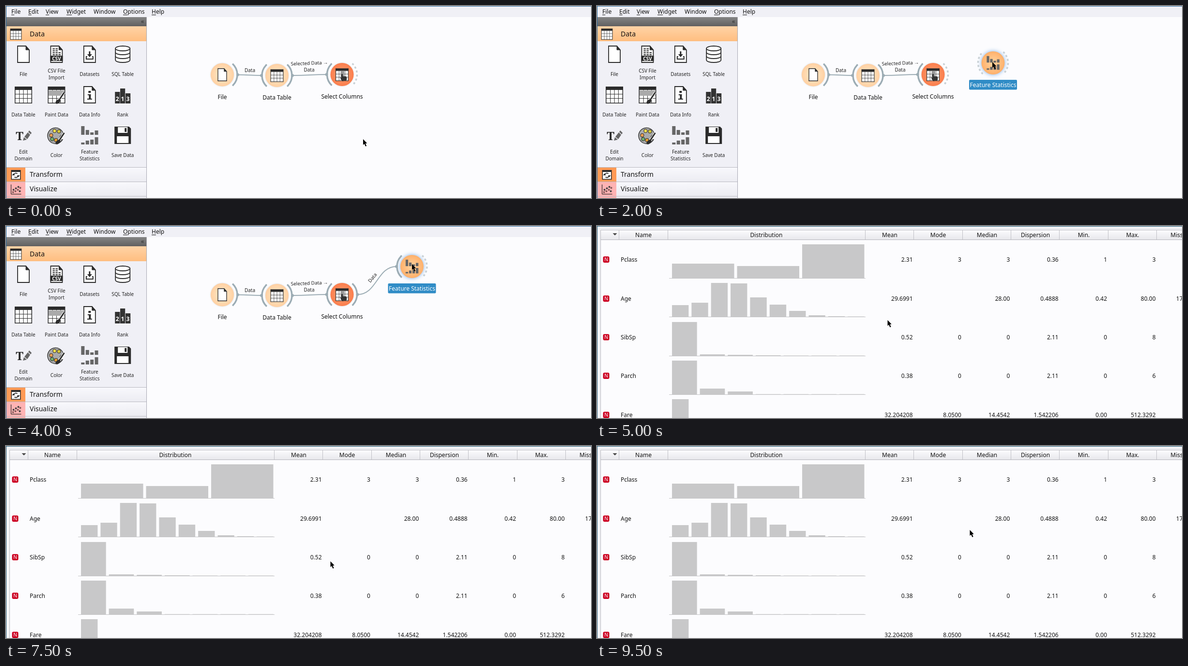
An HTML page with a canvas for the animation above (10 s loop, 1209x398 px).

```html
<!DOCTYPE html>
<html lang="en">
<head>
<meta charset="utf-8">
<title>Feature Statistics</title>
<style>
html, body { margin: 0; width: 100%; height: 100%; overflow: hidden; background: #fcfcfe; }
canvas { display: block; }
</style>
</head>
<body>
<canvas id="stage" width="1209" height="398"></canvas>
<script>
const W = 1209, H = 398, STEP = 500, LOOP = 10000;
const ctx = document.getElementById('stage').getContext('2d');
const INK = '#2b2b2b', GREY = '#666', LINK = '#9cacb4', PAPER = '#fcfcfe';
const FONT = '"Noto Sans", "Open Sans", sans-serif';

function rect(x, y, w, h, fill) {
  ctx.fillStyle = fill;
  ctx.fillRect(x, y, w, h);
}

function box(x, y, w, h, r, fill) {
  ctx.fillStyle = fill;
  ctx.beginPath();
  ctx.roundRect(x, y, w, h, r);
  ctx.fill();
}

function disc(x, y, r, fill) {
  ctx.fillStyle = fill;
  ctx.beginPath();
  ctx.arc(x, y, r, 0, Math.PI * 2);
  ctx.fill();
}

function poly(points, fill, stroke, width = 1) {
  ctx.beginPath();
  points.forEach(([x, y]) => ctx.lineTo(x, y));
  ctx.closePath();
  if (fill) { ctx.fillStyle = fill; ctx.fill(); }
  if (stroke) { ctx.strokeStyle = stroke; ctx.lineWidth = width; ctx.stroke(); }
}

function line(x1, y1, x2, y2, color, width = 1) {
  ctx.strokeStyle = color;
  ctx.lineWidth = width;
  ctx.beginPath();
  ctx.moveTo(x1, y1);
  ctx.lineTo(x2, y2);
  ctx.stroke();
}

function text(s, x, y, size = 12, align = 'left', color = '#111', style = '') {
  ctx.font = `${style} ${size}px ${FONT}`;
  ctx.textAlign = align;
  ctx.fillStyle = color;
  ctx.fillText(s, x, y);
}

function shade(y1, y2, ...colors) {
  const g = ctx.createLinearGradient(0, y1, 0, y2);
  colors.forEach((c, i) => g.addColorStop(i / (colors.length - 1), c));
  return g;
}

function at(x, y, scale, draw, angle = 0) {
  ctx.save();
  ctx.translate(x, y);
  ctx.rotate(angle);
  ctx.scale(scale, scale);
  draw();
  ctx.restore();
}

// Icons, each centred on the origin
function page() {
  poly([[-12, -17], [5, -17], [12, -9], [12, 17], [-12, 17]], '#fff', INK, 1.8);
  poly([[5, -17], [5, -9], [12, -9]], INK, INK, 1);
}

function csv() {
  page();
  for (let y = -12; y < 3; y += 4) {
    for (let x = -8; x < 8; x += 6) if (y > -8 || x < 3) rect(x, y, 4.5, 2, INK);
  }
  rect(-13, 3, 26, 11, INK);
  text('CSV', 0, 12.5, 10, 'center', '#fff', 'bold');
}

function datasets() {
  page();
  ctx.strokeStyle = INK;
  ctx.lineWidth = 2;
  ctx.strokeRect(-7, 5, 14, 5);
  rect(-5, 3, 10, 4, '#fff');
  rect(-1.5, -6, 3, 8, INK);
  poly([[-5, 0], [5, 0], [0, 6]], INK);
}

function sql() {
  ctx.strokeStyle = INK;
  ctx.lineWidth = 1.8;
  ctx.fillStyle = '#fff';
  ctx.beginPath();
  ctx.ellipse(0, -12, 15, 5, 0, Math.PI, 0);
  ctx.lineTo(15, 12);
  ctx.ellipse(0, 12, 15, 5, 0, 0, Math.PI);
  ctx.closePath();
  ctx.fill();
  ctx.stroke();
  for (const y of [-12, -4, 4]) {
    ctx.beginPath();
    ctx.ellipse(0, y, 15, 5, 0, 0, Math.PI);
    ctx.stroke();
  }
}

function table() {
  rect(-18, -17, 36, 35, INK);
  rect(-16.5, -10, 33, 26.5, '#fff');
  for (const x of [-8.3, 0, 8.3]) line(x, -10, x, 17, INK, 1);
  for (const y of [-1.2, 7.6]) line(-17, y, 17, y, INK, 1);
}

function brush() {
  line(16, -5, 6, 10, '#fff', 5);
  line(16, -5, 6, 10, INK, 3);
  ctx.fillStyle = INK;
  ctx.beginPath();
  ctx.ellipse(3, 14, 6, 3.5, -0.7, 0, 7);
  ctx.fill();
}

function paint() {
  table();
  rect(-16.5, -9, 33, 11, '#aaa');
  brush();
}

function info() {
  page();
  rect(-2.5, -8, 5, 4, INK);
  rect(-4, -1, 6.5, 2, INK);
  rect(-1.5, -1, 4, 10, INK);
  rect(-5, 8, 10, 2, INK);
}

function rank() {
  [[-16, -6, '2'], [-5.2, -13, '1'], [5.8, -3, '3']].forEach(([x, y, n]) => {
    rect(x, y, 10.2, 18 - y, '#333');
    text(n, x + 5, 13, 12, 'center', '#fff', 'bold');
  });
}

function domain() {
  ctx.font = 'bold 24px "Noto Serif", serif';
  ctx.textAlign = 'center';
  ctx.fillStyle = INK;
  ctx.fillText('T', -8, 10);
  poly([[-1, 11], [1, 4], [7, 9]], GREY);
  poly([[2, 3], [9, -6], [14, -1], [8, 8]], GREY);
  poly([[10, -7], [12, -10], [17, -5], [15, -2]], GREY);
}

function palette() {
  ctx.fillStyle = '#aaa';
  ctx.beginPath();
  ctx.ellipse(-2, 1, 16.5, 16.5, 0, 0.5, 6.1);
  ctx.quadraticCurveTo(5, 0, 7, 10);
  ctx.closePath();
  ctx.fill();
  ctx.strokeStyle = INK;
  ctx.lineWidth = 1.3;
  ctx.stroke();
  [[-11, 0, '#f0a050'], [-4, -9, '#ffe14d'], [5, -8, '#d8c840'], [-9, 8, '#70b070'], [-1, 10, '#e8a030']]
    .forEach(([x, y, c]) => { disc(x, y, 4, INK); disc(x, y, 3, c); });
  brush();
}

function stats() {
  [18, 10, 5, 9].forEach((h, i) => rect(-17.5 + 9.4 * i, -1 - h, 7, h, GREY));
  [4, 8, 10, 15].forEach((h, i) => rect(-17.5 + 9.4 * i, 19 - h, 7, h, GREY));
}

function floppy() {
  poly([[-17, -18], [13, -18], [17, -14], [17, 18], [-17, 18]], INK);
  rect(-10, -17, 20, 12, '#fff');
  rect(4, -15, 4, 8, INK);
  rect(-12, 2, 24, 14, '#fff');
}

function columns() {
  table();
  rect(-4, -10, 10, 27, '#999');
  ctx.fillStyle = '#333';
  ctx.beginPath();
  ctx.roundRect(-2, -2, 4, 16, 2);
  ctx.roundRect(-1, 5, 14, 12, 4);
  ctx.fill();
  poly([[-6, 7], [0, 10], [4, 19], [0, 18]], '#333');
}

function pointer(x, y) {
  at(x, y, 1, () => poly([[0, 0], [0, 12], [2.6, 9.8], [5, 15], [7.2, 14], [4.8, 9], [8.2, 8.6]], '#000'));
}

// Toolbox on the left
const WIDGETS = [
  [page, 'File'], [csv, 'CSV File', 'Import'], [datasets, 'Datasets'], [sql, 'SQL Table'],
  [table, 'Data Table'], [paint, 'Paint Data'], [info, 'Data Info'], [rank, 'Rank'],
  [domain, 'Edit', 'Domain'], [palette, 'Color'], [stats, 'Feature', 'Statistics'], [floppy, 'Save Data']
];

function menu() {
  rect(0, 0, W, 23, '#f0f0f6');
  [['File', 11], ['Edit', 46], ['View', 82], ['Widget', 125], ['Window', 181], ['Options', 242], ['Help', 301]]
    .forEach(([name, x]) => {
      text(name, x, 16);
      if (name !== 'Window') rect(x, 18, ctx.measureText(name[0]).width, 1, '#111');
    });
  rect(0, 0, W, 1, '#2d6ea5');
}

function category(y, name, color, icon) {
  rect(1, y, 289, 29, shade(y, y + 29, '#f8f8fc', '#ececf2'));
  rect(1, y, 39, 29, color);
  rect(1, y - 1, 289, 1, '#b8b8c0');
  at(20.5, y + 15, 1, icon);
  text(name, 49, y + 19, 14);
}

function transformIcon() {
  rect(-10, -10, 20, 20, INK);
  rect(-8.5, -6, 17, 14.5, '#fff');
  ctx.strokeStyle = INK;
  ctx.lineWidth = 1.8;
  for (const a of [0.2, 0.2 + Math.PI]) {
    ctx.beginPath();
    ctx.arc(0, 1, 4.5, a, a + 2.1);
    ctx.stroke();
  }
  poly([[-8, 1], [-2, 1], [-5, -3]], INK);
  poly([[8, 1], [2, 1], [5, 5]], INK);
}

function scatterIcon() {
  line(-10, -10, -10, 10, INK, 1.2);
  line(-10, 10, 11, 10, INK, 1.2);
  [[-6, 6], [-5, 1], [-1, 4], [0, -2], [4, 1], [5, -5], [9, -3], [8, 4]]
    .forEach(([x, y], i) => disc(x, y, 2, i % 2 ? '#444' : '#855a5a'));
}

function toolbox() {
  rect(0, 23, 290, 375, '#f0f0f6');
  rect(1, 23, 289, 19, shade(23, 42, '#858585', '#606060'));
  text('«', 282, 36, 13, 'center', '#333');
  rect(1, 42, 289, 31, shade(42, 73, '#ffd3a6', '#ffbe80'));
  at(20.5, 58, 0.66, table);
  text('Data', 49, 63, 14);
  WIDGETS.forEach(([icon, ...label], i) => {
    const x = 36 + 68.4 * (i % 4), y = 100 + 84 * Math.floor(i / 4);
    at(x, y, 1, icon);
    label.forEach((s, k) => text(s, x, y + (label.length > 1 ? 38 : 45) + 14 * k, 10, 'center', '#222'));
  });
  category(335, 'Transform', '#ff9a55', transformIcon);
  category(365, 'Visualize', '#ffb3b3', scatterIcon);
  rect(1, 394, 289, 1, '#b8b8c0');
  rect(1, 395, 39, 3, '#ffb3b3');
  rect(290, 23, 1, 375, '#a8a8b4');
  rect(0, 0, 1, H, '#2d6ea5');
}

// Workflow canvas
function anchor(x, y, side, linked) {
  const mid = side > 0 ? 0 : Math.PI;
  ctx.strokeStyle = linked ? LINK : '#c8d0d4';
  ctx.lineWidth = 3.5;
  ctx.setLineDash(linked ? [] : [4, 4.5]);
  ctx.beginPath();
  ctx.arc(x, y, 31, mid - 0.82, mid + 0.82);
  ctx.stroke();
  ctx.setLineDash([]);
  if (linked) disc(x + 32 * side, y, 3, LINK);
}

function node(x, y, name, icon, sides, colors, selected) {
  ctx.save();
  ctx.shadowColor = selected ? '#7aaee8' : 'rgba(140,150,160,.35)';
  ctx.shadowBlur = selected ? 9 : 3;
  const g = ctx.createRadialGradient(x, y, 3, x, y, 24);
  colors.forEach((c, i) => g.addColorStop(i, c));
  disc(x, y, 24, g);
  ctx.restore();
  at(x, y, 0.75, icon);
  const [left, right] = sides;
  if (left !== null) anchor(x, y, -1, left);
  if (right !== null) anchor(x, y, 1, right);
  if (selected) box(x - 49.5, y + 35, 99, 20.5, 2, '#308cc6');
  text(name, x, y + 50, 12, 'center', selected ? '#fff' : '#111');
}

function link(x1, y1, x2, y2) {
  const bend = (x2 - x1) / 2;
  ctx.strokeStyle = LINK;
  ctx.lineWidth = 2;
  ctx.beginPath();
  ctx.moveTo(x1, y1);
  ctx.bezierCurveTo(x1 + bend, y1, x2 - bend, y2, x2, y2);
  ctx.stroke();
}

function caption(s, x, y, angle = 0) {
  at(x, y, 1, () => text(s, 0, 4, 10, 'center', '#222'), angle);
}

function workflow({ fs, linked, drag, selected, wire }) {
  rect(0, 0, W, H, PAPER);
  const pale = ['#ffeac8', '#ffd0a2'];
  link(479, 142.5, 528, 144);
  link(592, 144, 663, 142);
  caption('Data', 504, 132.5);
  caption('Selected Data →', 627, 118, -0.04);
  caption('Data', 626.5, 132);
  if (linked) {
    const [x, y] = fs;
    link(726.5, 142, x - 32, y);
    caption('Data', (x + 679) / 2 - 2, (y + 142) / 2 - 6, -Math.atan2(142 - y, 48));
  }
  if (wire) link(726.5, 142, ...wire);
  node(447, 142.5, 'File', page, [null, true], pale);
  node(560, 144, 'Data Table', table, [true, true], pale);
  node(694.5, 142, 'Select Columns', columns, [true, !!(linked || wire)], ['#ffa070', '#fb7d4c']);
  if (fs) node(...fs, 'Feature Statistics', stats, [!!linked, false], ['#ffd09a', '#ffb06a'], selected);
  menu();
  toolbox();
  if (drag) at(...drag, 1, stats);
}

// Statistics table
const HEADS = [['Name', 96], ['Distribution', 350], ['Mean', 605], ['Mode', 705], ['Median', 806],
  ['Dispersion', 906], ['Min.', 1006], ['Max.', 1107], ['Missing', 1207]];
const ROWS = [
  ['N', 'Pclass', [30, 25, 70], '2.31 3 3 0.36 1 3'],
  ['N', 'Age', [24, 29, 70, 69, 40, 25, 12, 3, 1, 0.5], '29.6991 - 28.00 0.4888 0.42 80.00'],
  ['N', 'SibSp', [70, 3, 2, 1, 0.5, 0.5, 0.5], '0.52 0 0 2.11 0 8'],
  ['N', 'Parch', [70, 12, 6, 0.5, 0.5, 0.5, 0.5], '0.38 0 0 2.11 0 6'],
  ['N', 'Fare', [70, 8, 1, 0.5, 0.5, 0.5, 0.5, 0.5, 0.5, 0.5], '32.204208 8.0500 14.4542 1.542206 0.00 512.3292'],
  ['C', 'Survived', [70, 43], '- 0 - 0.666 - -'],
  ['C', 'Sex', [37, 70], '- male - 0.649 - -'],
  ['C', 'Embarked', [18, 8, 70], '- S - 0.76 - -']
];

function row([type, name, bars, values], y) {
  const baseline = Math.round(y + 4.5), base = Math.round(y + 38.2);
  box(12.5, baseline - 11, 13, 13, 3, type === 'N' ? '#cc0022' : '#1f9144');
  text(type, 19, baseline - 1, 10, 'center', '#fff');
  text(name, 49, baseline);
  const pitch = 403.5 / bars.length;
  bars.forEach((h, i) => rect(155 + pitch * i, base - h, pitch - 6, h, '#c8c8c9'));
  rect(149, base, 406, 1, '#c4c4c6');
  values.split(' ').forEach((v, i) => {
    if (v !== '-') text(v, 652.5 + 100.4 * i, baseline, 12, 'right');
  });
  if (name === 'Age') text('177 (20 %)', 1254.5, baseline, 12, 'right');
}

function statistics(scroll) {
  rect(0, 0, W, H, PAPER);
  ROWS.forEach((r, i) => row(r, 69.9 + 80.3 * i - scroll));
  rect(0, 0, W, 8, '#f0f0f4');
  rect(0, 0, 7, H, '#f4f4f8');
  rect(7, 8, 1, H, '#b8b8be');
  rect(8, 8, W, 20, shade(8, 28, '#fcfcfe', '#e8e8ec'));
  rect(7, 8, W, 1, '#c0c0c6');
  rect(7, 28, W, 1, '#b4b4ba');
  for (const x of [45, 146, 554, 654, 755, 855, 955, 1056, 1156]) rect(x, 9, 1, 19, '#c0c0c6');
  HEADS.forEach(([s, x]) => text(s, x, 23, 12, 'center'));
  poly([[32.5, 15], [41.5, 15], [37, 19.5]], '#444');
  rect(0, 0, W, 1, '#135272');
  rect(0, 0, 1, H, '#2d6280');
}

const DROP = [818.5, 118], HOME = [839, 84];
const POSES = [
  { cursor: [738, 276] },
  { cursor: [430, 286] },
  { cursor: [172, 268] },
  { cursor: [500, 190], drag: [500, 190] },
  { cursor: [817, 116], fs: DROP, selected: true },
  { cursor: [733, 146], fs: DROP, selected: true },
  { cursor: [772, 130], fs: DROP, wire: [772, 130] },
  { cursor: [817, 114], fs: DROP, linked: true, selected: true },
  { cursor: [839, 79], fs: HOME, linked: true, selected: true },
  { cursor: [839, 79], fs: HOME, linked: true, selected: true },
  { cursor: [600.5, 195], scroll: 0 },
  { cursor: [622, 215], scroll: 80.3 },
  { cursor: [650, 243], scroll: 160.6 },
  { cursor: [660.5, 251], scroll: 241.9 },
  { cursor: [667, 247], scroll: 80.3 },
  { cursor: [670.5, 239], scroll: 0 },
  { cursor: [695, 225], scroll: 0 },
  { cursor: [722, 208], scroll: 0 },
  { cursor: [748, 190], scroll: 0 },
  { cursor: [770.5, 174], scroll: 0 }
];

function frame(now) {
  const pose = POSES[Math.floor((now % LOOP) / STEP)];
  if (pose.scroll === undefined) workflow(pose);
  else statistics(pose.scroll);
  pointer(...pose.cursor);
  requestAnimationFrame(frame);
}
frame(0);
</script>
</body>
</html>
```
